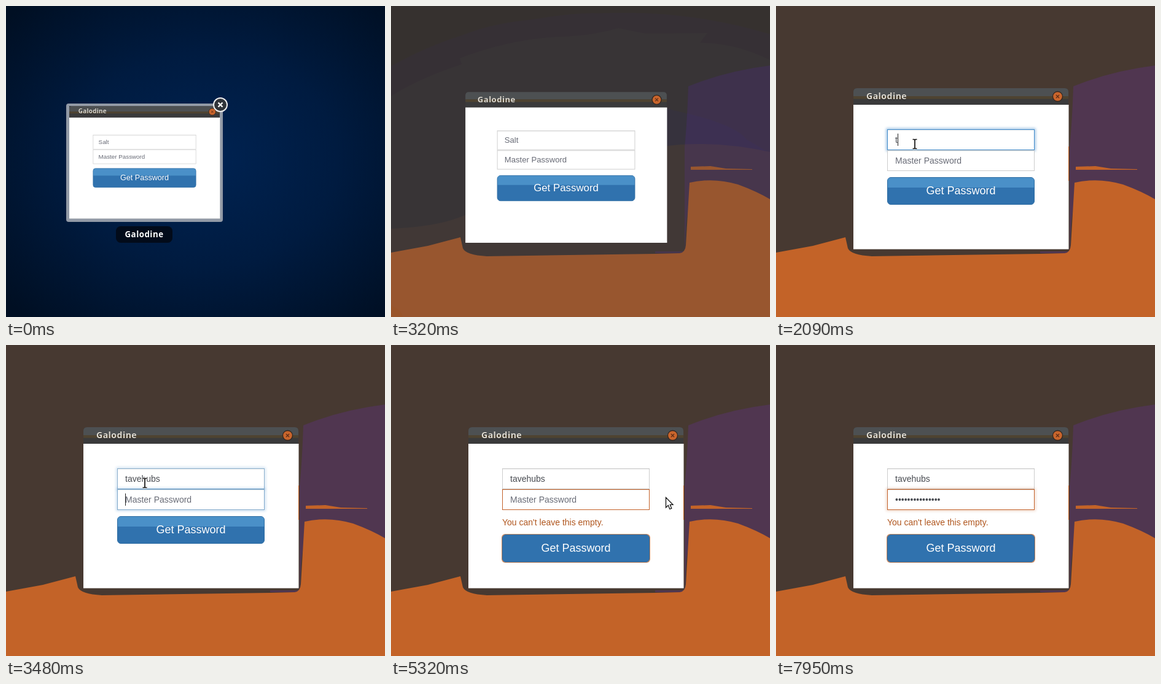
An HTML page that plays this animation: 617 by 507 pixels, repeating every 7990 ms.

```html
<!DOCTYPE html>
<html lang="en">
<head>
<meta charset="utf-8">
<title>Password window</title>
<style>
  html, body { margin: 0; width: 100%; height: 100%; overflow: hidden; background: #473931; }
  svg { display: block; width: 100vw; height: 100vh; }
  text { font-family: "Liberation Sans", Arial, sans-serif; font-size: 14px; white-space: pre; }
  .bold { font-family: "Noto Sans", "Open Sans", sans-serif; font-weight: 700; }
  .hint { fill: #686b76; }
  .typed { fill: #474a50; }
  .box { fill: none; stroke: #ccc; }
</style>
</head>
<body>
<svg viewBox="0 0 617 507">
  <defs>
    <radialGradient id="night" gradientUnits="userSpaceOnUse" cx="0" cy="0" r="1"
      gradientTransform="translate(325 250) scale(430 350)">
      <stop offset="0" stop-color="#002352"/>
      <stop offset=".5" stop-color="#001b40"/>
      <stop offset="1" stop-color="#000f23"/>
    </radialGradient>
    <filter id="blur" x="-10%" y="-40%" width="120%" height="180%"><feGaussianBlur stdDeviation="2"/></filter>
  </defs>

  <!-- wallpaper -->
  <rect width="617" height="507" fill="#473931"/>
  <path fill="#503650" d="M484 131Q545 106 617 97V325H485L481 350 478 400H430V403H470Q477 403 478 395V230Q482 190 484 131Z"/>
  <path fill="#c36328" d="M0 402L60 391 113 377 117 395Q122 406 156 408L430 404 470 403Q479 402 480 390L486 288Q525 279 565 291 595 302 617 315V507H0ZM488 262L520 261 545 265 588 266V267H488Z"/>

  <!-- dimming bands seen while the overview closes -->
  <g id="bands">
    <rect width="617" height="507" fill="#152844"/>
    <path fill="#0f1c40" d="M0 147Q45 118 115 95L112 85Q200 52 280 50 330 48 370 36L415 45 515 44 503 60Q560 60 617 88V0H0Z"/>
    <path fill="#10202d" d="M0 98Q60 65 115 48 165 28 230 22 300 10 340 12 480 5 617 46V0H0Z"/>
    <path fill="#10245a" d="M350 150Q400 146 460 170 560 192 578 217L617 240 381 300Z"/>
    <path fill="#333743" d="M0 363Q70 360 110 345L380 242Q490 210 617 238V507H0Z"/>
    <path fill="#343632" d="M0 488Q15 494 20 507H0Z"/>
  </g>

  <rect id="overview" width="617" height="507" fill="url(#night)"/>
  <g id="frame">
    <rect x="98" y="159" width="255" height="193" rx="4" fill="#929aa6"/>
    <rect x="103" y="163" width="245" height="184" fill="#26303d"/>
  </g>

  <g id="win">
    <path fill="#3a3a3b" d="M126 162V140Q126 134 132 134H470Q476 134 476 140V162Z"/>
    <path fill="#4d5052" d="M126 147V140Q126 134 132 134H470Q476 134 476 140V147Z"/>
    <rect x="126" y="147" width="350" height="4.500" fill="#4e4331"/>
    <text class="bold" x="147" y="152.500" letter-spacing=".5" fill="#1d1d1d">Galodine</text>
    <text class="bold" x="147" y="151.500" letter-spacing=".5" fill="#dfdbd2">Galodine</text>
    <circle cx="458.500" cy="147.500" r="8" fill="#c9652c" stroke="#33261f" stroke-width="1.300"/>
    <path d="M456 145l5 5m0-5l-5 5" stroke="#5b2c17" stroke-width="1.300"/>
    <rect x="126" y="161" width="350.500" height="235.500" fill="#fff"/>

    <g id="salt">
      <rect class="glow" x="181.500" y="201.500" width="239" height="33" fill="none" stroke="#66afe9" stroke-width="4" filter="url(#blur)"/>
      <rect x="181" y="201" width="240" height="34" fill="#fff"/>
      <path d="M182 202.500H420" stroke="#eee"/>
      <rect class="box" x="181.500" y="201.500" width="239" height="33"/>
      <rect class="edge" x="181.500" y="201.500" width="239" height="33" fill="none" stroke="#428bca"/>
      <text class="hint" x="194" y="223">Salt</text>
      <text class="typed" x="194" y="223"></text>
      <path class="caret" d="M.5 208V228" stroke="#222"/>
    </g>
    <g id="pass">
      <rect class="glow" x="181.500" y="235.500" width="239" height="33" fill="none" stroke-width="4" filter="url(#blur)"/>
      <rect x="181" y="235" width="240" height="34" fill="#fff"/>
      <path d="M182 236.500H420" stroke="#eee"/>
      <rect class="box" x="181.500" y="235.500" width="239" height="33"/>
      <rect class="edge" x="181.500" y="235.500" width="239" height="33" fill="none"/>
      <text class="hint" x="194" y="257">Master Password</text>
      <text class="typed" x="194" y="257"></text>
      <path class="caret" d="M.5 242V262" stroke="#222"/>
    </g>

    <text id="error" x="181" y="294" fill="#b0561e">You can't leave this empty.</text>
    <g id="button">
      <rect id="ring" x="180" y="278" width="242" height="47" rx="6" fill="#c98a63"/>
      <rect x="181.500" y="279.500" width="239" height="44" rx="5.500" fill="#3072ae" stroke="#2d6ca2"/>
      <path id="shine" fill="#4a90c8" d="M182 296V285Q182 280 187 280H415Q420 280 420 285V296Z"/>
      <text x="301" y="307" text-anchor="middle" fill="#fff" style="font-size:18px">Get Password</text>
    </g>
  </g>
  <path id="rim" d="M476.500 229V285" stroke="#c36328"/>

  <g id="badge">
    <circle cx="349" cy="161" r="11" fill="#30343a" stroke="#eee" stroke-width="2"/>
    <path d="M345.500 157.500l7 7m0-7l-7 7" stroke="#fff" stroke-width="2.400"/>
    <rect x="179" y="359" width="92" height="27" rx="8" fill="#020b1a"/>
    <text class="bold" x="225" y="377" text-anchor="middle" fill="#fff" letter-spacing=".5" style="font-size:13.300px">Galodine</text>
  </g>

  <g id="beam" fill="none">
    <path d="M-3.500-7.500H-1L0-6.500 1-7.500H3.500M0-7V7M-3.500 7.500H-1L0 6.500 1 7.500H3.500" stroke="#fff" stroke-width="3.600"/>
    <path d="M-3.500-7.500H-1L0-6.500 1-7.500H3.500M0-7V7M-3.500 7.500H-1L0 6.500 1 7.500H3.500" stroke="#111" stroke-width="1.700"/>
  </g>
  <path id="arrow" d="M.5.500V17L4.300 13.300 6.800 19.500 9.800 18.300 7.300 12.300H12Z" fill="#fff" stroke="#111" stroke-width="1.300"/>
</svg>
<script>
const LOOP = 7990;
const $ = id => document.getElementById(id);
const clamp = v => Math.max(0, Math.min(1, v));
const ramp = (t, start, length) => clamp((t - start) / length);
const between = (t, a, b) => t >= a && t < b;
const show = (el, on) => el.setAttribute('visibility', on ? 'visible' : 'hidden');
const fade = (el, v) => el.setAttribute('opacity', v);
const move = (el, x, y, s = 1) => el.setAttribute('transform', `translate(${x} ${y}) scale(${s})`);

function field(id) {
  const part = name => $(id).querySelector('.' + name);
  const glow = part('glow'), edge = part('edge'), hint = part('hint');
  const typed = part('typed'), caret = part('caret');
  return (text, focus, border, caretOn, color) => {
    glow.setAttribute('stroke', color);
    edge.setAttribute('stroke', color);
    fade(glow, focus * .6);
    fade(edge, border);
    show(hint, !text);
    if (typed.textContent !== text) typed.textContent = text;
    show(caret, caretOn);
    move(caret, 194 + (text ? Math.round(typed.getComputedTextLength()) : 0), 0);
  };
}
const salt = field('salt'), pass = field('pass');

const word = 'tavehubs';
const keys = [2430, 2590, 2670, 2870, 3000, 3150, 3240];
function saltText(t) {
  if (t < 1250) return '';
  if (between(t, 1460, 2090)) return 'ts';
  return word.slice(0, 1 + keys.filter(k => t >= k).length);
}

function dotCount(t) {
  const burst = (start, gap, max) => t < start ? 0 : Math.min(max, 1 + Math.floor((t - start) / gap));
  return burst(6750, 63.75, 9) + burst(7420, 58, 6);
}

// time, x, y
const track = [
  [4430, 226, 225], [4700, 370, 262], [4950, 497, 272], [5240, 447, 248],
  [5330, 447, 248], [5480, 390, 252], [5830, 390, 252], [6030, 577, 304]
];
function pointer(t) {
  const i = track.findIndex(p => t < p[0]);
  if (i === 0) return track[0].slice(1);
  if (i < 0) return track[track.length - 1].slice(1);
  const [t0, x0, y0] = track[i - 1], [t1, x1, y1] = track[i];
  const u = (t - t0) / (t1 - t0);
  return [x0 + (x1 - x0) * u, y0 + (y1 - y0) * u];
}

function draw(t) {
  // the window zooms in 50 ms steps
  const tick = t < 170 ? 0 : 170 + Math.floor((t - 170) / 50) * 50;
  const u = ramp(tick, 130, 270);
  const zoom = u * u * (3 - 2 * u);
  const rest = 1 - zoom;
  move($('win'), 14.8 * rest, 69.2 * rest, 1 - .3 * rest);
  fade($('overview'), t < 170 ? 1 : clamp(1 - zoom / .25));
  fade($('bands'), zoom < .27 ? 1 : rest / .73);
  show($('frame'), t < 170);
  show($('badge'), t < 170);
  show($('rim'), zoom === 1);

  const saltFocus = ramp(t, 470, 150) - ramp(t, 3400, 150);
  const saltCaret = between(t, 520, 990) || between(t, 1250, 2050) || between(t, 2090, 3400);
  salt(saltText(t), saltFocus, saltFocus, saltCaret, '#428bca');

  const failed = t >= 3720;
  const passFocus = ramp(t, 3400, 150) - ramp(t, 3720, 150) + ramp(t, 5450, 150) - ramp(t, 7870, 150);
  const passCaret = between(t, 3400, 3720) || between(t, 5450, 6030) || between(t, 6750, 7870);
  pass('•'.repeat(dotCount(t)), passFocus, failed ? 1 : passFocus, passCaret, failed ? '#c3622a' : '#428bca');

  const pressed = between(t, 3720, 5450) || t >= 7870;
  show($('error'), failed);
  move($('button'), 0, failed ? 30 : 0);
  show($('ring'), pressed);
  show($('shine'), !pressed);

  const [x, y] = pointer(t);
  const seen = between(t, 400, 6030);
  const overField = x > 181 && x < 421 && y > 201 && y < 269;
  show($('beam'), seen && overField);
  show($('arrow'), seen && !overField);
  move($('beam'), x, y);
  move($('arrow'), x, y);
}

function loop() {
  draw(performance.now() % LOOP);
  requestAnimationFrame(loop);
}
loop();
</script>
</body>
</html>
```
